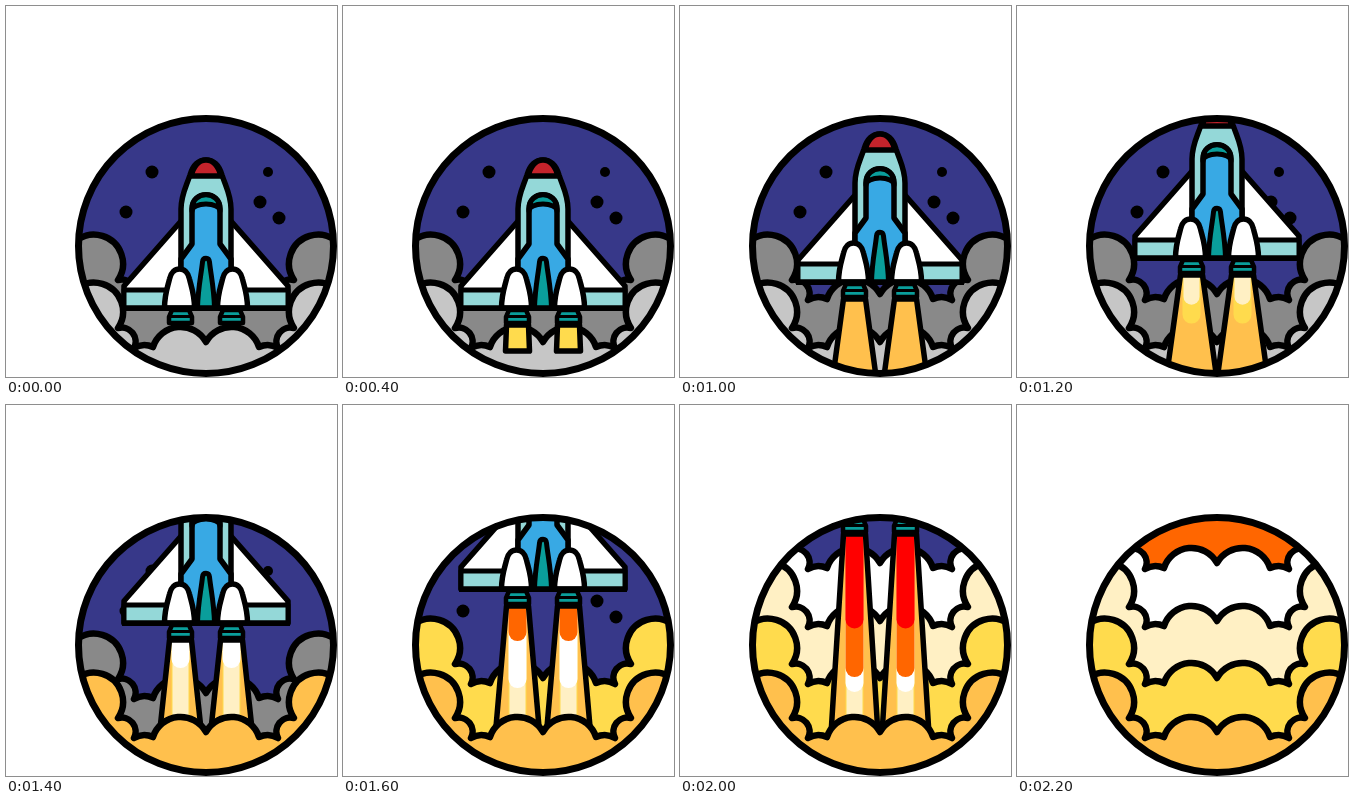
Write an HTML page with a canvas that moves like this. It is 331x371 px and loops after 2.3 s.

```html
<!DOCTYPE html>
<html lang="en">
<head>
<meta charset="utf-8">
<title>Shuttle launch</title>
<style>
  html, body { margin: 0; width: 100%; height: 100%; overflow: hidden; background: #fff; }
  canvas { display: block; }
</style>
</head>
<body>
<canvas id="stage" width="331" height="371"></canvas>
<script>
const ctx = document.getElementById('stage').getContext('2d');
const LOOP = 2300, STEP = 100, MID = 200;
const INK = '#000', SKY = '#373889', CYAN = '#94d8d8', BLUE = '#38a9e4', TEAL = '#0a9e9b';
const YELLOW = '#ffdb4d', AMBER = '#ffc04d', CREAM = '#fff0c4', WHITE = '#fff', ORANGE = '#ff6600';

const stars = [[146, 166, 6.5], [120, 206, 6.5], [262, 166, 5], [254, 196, 6.5], [273, 212, 6.5]];

const cloud = new Path2D(
  'M59 297 A29 29 0 1 1 112 313 A14 14 0 0 1 128 333 A20 20 0 0 1 147 332 A29 29 0 0 1 200 327 ' +
  'A29 29 0 0 1 253 332 A20 20 0 0 1 272 333 A14 14 0 0 1 288 313 A29 29 0 1 1 341 297 V620 H59 Z');

const shape = {
  wing: new Path2D('M176 214 L118 280 V302 H176 Z'),
  flap: new Path2D('M118 284 H162 V302 H118 Z'),
  hull: new Path2D('M175 302 V203 C175 189 180 181 184 169 C187 159 193 154 200 154 ' +
    'C207 154 213 159 216 169 C220 181 225 189 225 203 V302 Z'),
  nose: new Path2D('M185 170 C188 159 194 154 200 154 C206 154 212 159 215 170 Z'),
  deck: new Path2D('M175 302 V253 L186 238 V203 C186 184 214 184 214 203 V238 L225 253 V302 Z'),
  hatch: new Path2D('M186 205 V203 C186 184 214 184 214 203 V205 A14 7 0 0 0 186 205 Z'),
  fin: new Path2D('M191.5 302 C192 282 195 270 196.5 256 C197 251 203 251 203.5 256 C205 270 208 282 208.5 302 Z'),
  booster: new Path2D('M158.5 302 C158.5 288 162 280 163.5 273 C166 259.5 181 259.5 183.5 273 C185 280 188.5 288 188.5 302 Z'),
  nozzle: new Path2D('M166 304 H183 L186 311 V317 H163 V311 Z')
};

// Linear interpolation through [x, y] points, held at both ends.
function track(points, x) {
  if (x <= points[0][0]) return points[0][1];
  for (let i = 1; i < points.length; i++) {
    const [x0, y0] = points[i - 1], [x1, y1] = points[i];
    if (x <= x1) return y0 + (y1 - y0) * (x - x0) / (x1 - x0);
  }
  return points[points.length - 1][1];
}

const lift = n => track([[6, 0], [8, -14], [9, -14], [12, -50], [16, -118], [21, -208]], n);
const flare = n => track([[0, 11], [6, 12.5], [8, 20], [12, 27]], n);

function paint(path, fill, width = 5.5) {
  ctx.fillStyle = fill;
  ctx.fill(path);
  ctx.lineWidth = width;
  ctx.stroke(path);
}

function bothSides(draw) {
  draw();
  ctx.save();
  ctx.translate(2 * MID, 0);
  ctx.scale(-1, 1);
  draw();
  ctx.restore();
}

function drawCloud(color, dy) {
  ctx.save();
  ctx.translate(0, dy);
  paint(cloud, color, 6.5);
  ctx.restore();
}

// Colours leave the nozzle one after another: [colour, first step, half width, lowest end].
const streaks = [
  [YELLOW, 10.2, 9, 400], [CREAM, 10.9, 8, 400], [WHITE, 12.96, 9, 287],
  [ORANGE, 14.7, 9, 400], ['#ff0000', 16.5, 9, 400]
];

function drawFlame(n) {
  const x = 174.5, top = 319 + lift(n);
  const bottom = n <= 6 ? 313 + 8 * n : 385;
  const half = flare(n);
  const body = new Path2D();
  body.moveTo(x - 11, top);
  body.lineTo(x + 11, top);
  body.lineTo(x + half, bottom);
  body.lineTo(x - half, bottom);
  body.closePath();
  ctx.fillStyle = n < 10 ? YELLOW : AMBER;
  ctx.fill(body);
  ctx.save();
  ctx.clip(body);
  for (const [color, start, w, limit] of streaks) {
    const end = Math.min(limit, top + 27 * (n - start));
    if (end <= top) continue;
    ctx.fillStyle = color;
    ctx.beginPath();
    ctx.roundRect(x - w, top - 30, 2 * w, end - top + 30, [0, 0, w, w]);
    ctx.fill();
  }
  ctx.restore();
  ctx.lineWidth = 5.5;
  ctx.stroke(body);
}

function drawNozzle() {
  paint(shape.nozzle, TEAL, 4.5);
  ctx.fillStyle = INK;
  ctx.fillRect(163, 309, 23, 3);
}

function drawShuttle(dy) {
  ctx.save();
  ctx.translate(0, dy);
  bothSides(drawNozzle);
  bothSides(() => {
    paint(shape.wing, WHITE);
    paint(shape.flap, CYAN, 5);
  });
  paint(shape.hull, CYAN);
  paint(shape.nose, '#c4232b');
  paint(shape.deck, BLUE);
  paint(shape.hatch, TEAL, 5);
  paint(shape.fin, TEAL, 5);
  bothSides(() => paint(shape.booster, WHITE));
  ctx.fillStyle = INK;
  ctx.fillRect(116, 299.5, 168, 5.5);
  ctx.restore();
}

function drawScene(n) {
  const ended = n >= 22;
  ctx.fillStyle = ended ? ORANGE : SKY;
  ctx.fillRect(0, 0, 331, 371);
  ctx.fillStyle = INK;
  if (!ended) for (const [x, y, r] of stars) {
    ctx.beginPath();
    ctx.arc(x, y, r, 0, 7);
    ctx.fill();
  }
  if (n >= 20) drawCloud(WHITE, -169);
  if (n >= 18) drawCloud(CREAM, -111);
  if (n >= 16) drawCloud(YELLOW, -54);
  else drawCloud('#898989', -39);
  if (n < 14) drawCloud('#c6c6c6', 9);
  if (!ended) {
    if (n > 0) bothSides(() => drawFlame(n));
    drawShuttle(lift(n));
  }
  if (n >= 14) drawCloud(AMBER, 0);
}

function render(now) {
  const n = Math.floor(now % LOOP / STEP);
  ctx.fillStyle = WHITE;
  ctx.fillRect(0, 0, 331, 371);
  ctx.strokeStyle = INK;
  ctx.lineJoin = 'round';
  ctx.save();
  ctx.beginPath();
  ctx.arc(MID, 240, 127, 0, 7);
  ctx.clip();
  drawScene(n);
  ctx.restore();
  ctx.lineWidth = 7;
  ctx.beginPath();
  ctx.arc(MID, 240, 127.5, 0, 7);
  ctx.stroke();
}

const begin = performance.now();
function tick() {
  render(performance.now() - begin);
  requestAnimationFrame(tick);
}
tick();
</script>
</body>
</html>
```
